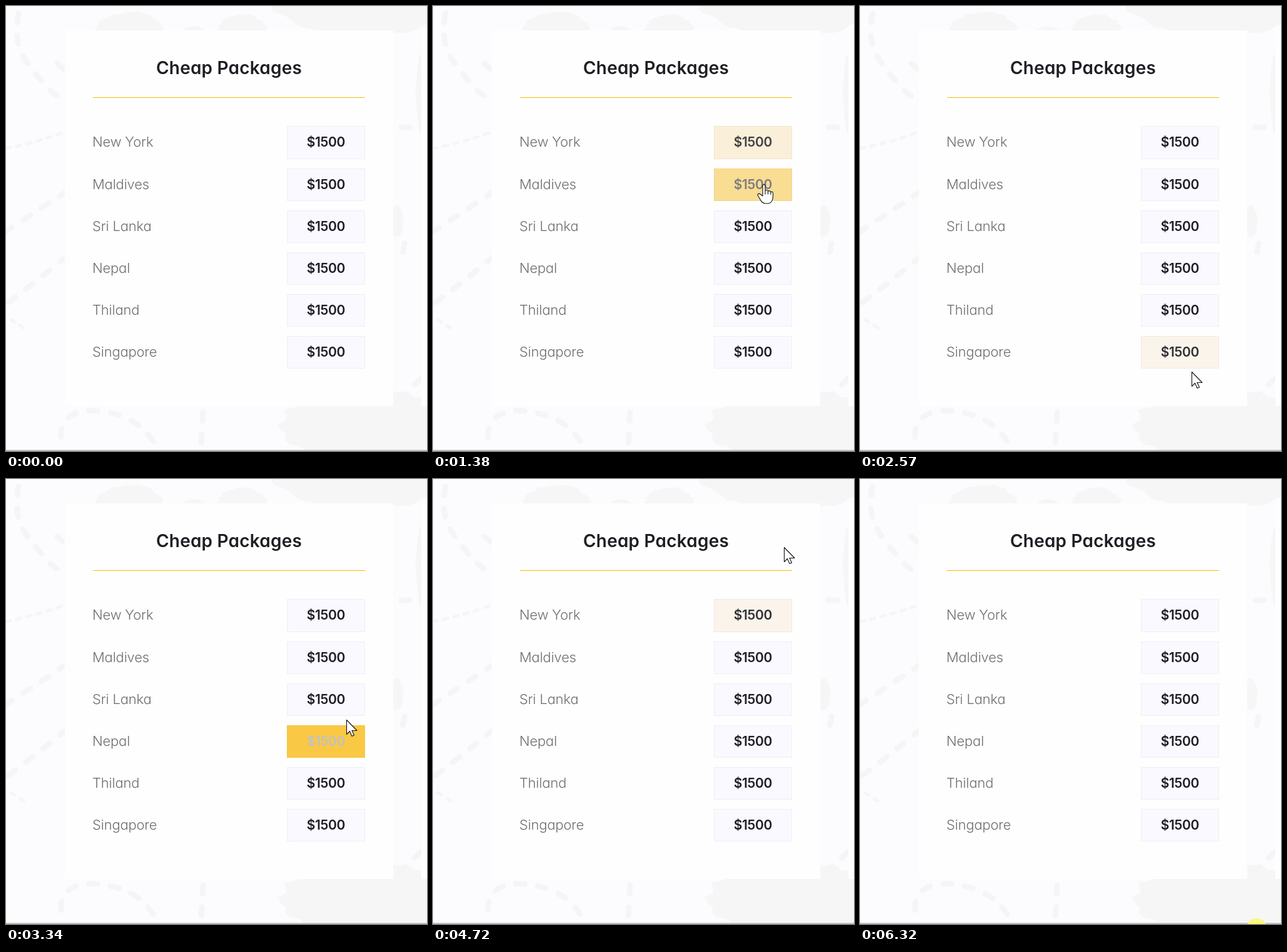
An HTML page that plays this animation: 673x712 px, repeating every 6.38 s.

```html
<!DOCTYPE html>
<html lang="en">
<head>
<meta charset="utf-8">
<title>Cheap Packages</title>
<style>
  html, body { margin: 0; width: 100%; height: 100%; overflow: hidden; background: #fcfcff; }
  svg { display: block; width: 673px; height: 712px; }
  text { font-family: Poppins, Inter, "Open Sans", sans-serif; font-feature-settings: "cv11"; }
  .title { font-size: 28px; font-weight: 600; fill: #1f1e24; text-anchor: middle; letter-spacing: .2px; }
  .place { font-size: 22px; font-weight: 300; fill: #706f70; letter-spacing: -.2px; }
  .price { font-size: 21px; font-weight: 600; text-anchor: middle; letter-spacing: -.4px; }
  #land { fill: #f6f6f7; }
  .route { fill: none; stroke: #f5f5f7; stroke-width: 9; stroke-linecap: round; stroke-dasharray: 14 21; }
  .thin { stroke-width: 5; stroke-dasharray: 7 10; }
  .pointer { fill: #fff; stroke: #111; stroke-width: 1.1; stroke-linejoin: round; stroke-linecap: round; }
</style>
</head>
<body>
<svg viewBox="0 0 673 712">
  <rect width="673" height="712" fill="#fcfcff"/>
  <g id="land"></g>

  <g class="route">
    <path d="M20 12C10 62 28 86 52 114S80 146 104 152"/>
    <path d="M82 92L96 104"/>
    <path d="M-2 362L104 292"/>
    <path d="M4 474Q50 440 100 398"/>
    <path d="M88 690C86 660 110 644 146 648S216 662 240 704"/>
    <path d="M315 650L312 706"/>
    <path d="M632 194H646"/>
    <path d="M637 380L634 396"/>
    <path d="M628 630L666 594"/>
    <path class="thin" d="M0 228Q50 218 98 200"/>
    <path class="thin" d="M8 502L36 520"/>
  </g>

  <rect x="94" y="39" width="525" height="601" fill="#fefefe"/>
  <rect x="664" y="39" width="9" height="601" fill="#fefefe"/>
  <rect y="710" width="673" height="2" fill="#c5c5c7"/>

  <text class="title" x="356.5" y="109">Cheap Packages</text>
  <rect x="139" y="146" width="435" height="1" fill="#f8b900"/>

  <g id="rows"></g>

  <circle id="halo" cx="634" cy="720" r="17" fill="#fbf77c"/>
  <path id="arrow" class="pointer" d="M.5 .5V23.5L5.5 18.5L9 26.5L12.5 25L9 17.5H17Z"/>
  <path id="hand" class="pointer" d="M-2 19V2.5C-2 0 2 0 2 2.5V16V10.5C3 9 6 9 6.5 11.5V16V11.5C8 10 10.5 10.5 11 13V16.5V13C12 11.5 14.5 12 14.5 14.5V20C14.5 26 11.5 31 6 31H2.5C-2.5 31 -4.5 27.5 -6.5 23.5L-9.5 18.5C-11 16 -8 14 -6 16Z"/>
</svg>

<script>
const LOOP = 6380, REFRESH = 70, STEP = 10, FADE = 250;
const places = ["New York", "Maldives", "Sri Lanka", "Nepal", "Thiland", "Singapore"];
const $ = id => document.getElementById(id);

function addNode(parent, tag, attrs, text = "") {
  const node = document.createElementNS("http://www.w3.org/2000/svg", tag);
  for (const key in attrs) node.setAttribute(key, attrs[key]);
  node.textContent = text;
  return parent.appendChild(node);
}

// ragged ellipse, its coast roughened by a seeded generator
let seed = 7;
const random = () => (seed = seed * 16807 % 2147483647) / 2147483647;
function addLand(cx, cy, rx, ry) {
  const points = Array.from({ length: 48 }, (_, i) => {
    const angle = i / 48 * 2 * Math.PI, r = .93 + .12 * random();
    return [cx + rx * r * Math.cos(angle), cy + ry * r * Math.sin(angle)];
  });
  addNode($("land"), "polygon", { points: points.join(" ") });
}
addLand(198, 45, 56, 36);
addLand(300, 42, 18, 10);
addLand(378, 42, 40, 29);
addLand(570, -4, 140, 52);
addLand(666, 140, 11, 66);
addLand(625, 345, 10, 26);
addLand(575, 670, 136, 60);

const rows = places.map((name, i) => {
  const exact = 192.35 + 67.16 * i;
  const top = Math.round(exact), bottom = Math.round(exact + 52.2), y = top + 33;
  addNode($("rows"), "text", { class: "place", x: 138, y }, name);
  return {
    top, bottom,
    box: addNode($("rows"), "rect", { x: 449.5, y: top + .5, width: 124, height: bottom - top - 1 }),
    price: addNode($("rows"), "text", { class: "price", x: 511.3, y }, "$1500")
  };
});

// where the pointer turns or changes pace: time, x, y
const path = [
  [120, 370, 604], [260, 464, 565], [520, 462, 172], [750, 496, 108], [960, 520, 100],
  [1450, 530, 316], [1650, 536, 379], [1720, 537, 392], [1800, 538, 433],
  [2080, 535, 530], [2340, 532, 581], [2430, 530, 597], [2570, 530, 585], [2710, 535, 588],
  [3000, 540, 505], [3700, 549, 258], [3800, 551, 212], [4440, 551, 206],
  [4740, 562, 102], [4900, 563, 108], [5050, 557, 192], [5280, 550, 196],
  [5450, 562, 215], [5760, 597, 422], [6320, 634, 720]
];

function tipAt(t) {
  if (t < path[0][0]) return null;
  const i = path.findIndex(key => key[0] > t);
  if (i < 0) return path.at(-1).slice(1);
  const [t0, x0, y0] = path[i - 1], [t1, x1, y1] = path[i];
  const f = (t - t0) / (t1 - t0);
  return [x0 + (x1 - x0) * f, y0 + (y1 - y0) * f];
}

// the picture refreshes in three runs: start and end
const runs = [[120, 4040], [4440, 5750], [5760, 6320]];
function refreshTime(t) {
  const run = runs.findLast(([start]) => t >= start);
  if (!run) return 0;
  const [start, end] = run;
  return Math.min(end, start + Math.floor((t - start) / REFRESH) * REFRESH);
}

const hoveredRow = tip => tip && tip[0] >= 449 && tip[0] < 574
  ? rows.findIndex(row => tip[1] >= row.top && tip[1] < row.bottom) : -1;

// hover level of every row, worked out once along the path
const states = [];
let levels = rows.map(() => 0);
for (let t = 0; t <= LOOP; t += STEP) {
  const tip = tipAt(t), over = hoveredRow(tip);
  levels = levels.map((v, i) => Math.min(1, Math.max(0, v + (i === over ? 1 : -1) * STEP / FADE)));
  states.push({ tip, over, levels });
}

const mix = (a, b, f) => `rgb(${a.map((v, i) => Math.round(v + (b[i] - v) * f))})`;
const yellow = [248, 182, 0];

function show(node, visible) {
  node.style.display = visible ? "" : "none";
}

function movePointer(node, tip, visible) {
  show(node, visible);
  if (visible) node.setAttribute("transform", `translate(${tip.map(Math.round)})`);
}

function draw(t) {
  const shown = refreshTime(t);
  const { tip, over, levels } = states[Math.floor(shown / STEP)];
  rows.forEach((row, i) => {
    const f = levels[i] * (2 - levels[i]);
    row.box.setAttribute("fill", mix([250, 249, 255], yellow, f));
    row.box.setAttribute("stroke", mix([238, 238, 243], yellow, f));
    row.price.setAttribute("fill", mix([31, 30, 36], [255, 255, 255], f));
  });
  movePointer($("arrow"), tip, tip && over < 0);
  movePointer($("hand"), tip, over >= 0);
  show($("halo"), shown >= 6320);
}

function tick() {
  draw(performance.now() % LOOP);
  requestAnimationFrame(tick);
}
tick();
</script>
</body>
</html>
```
